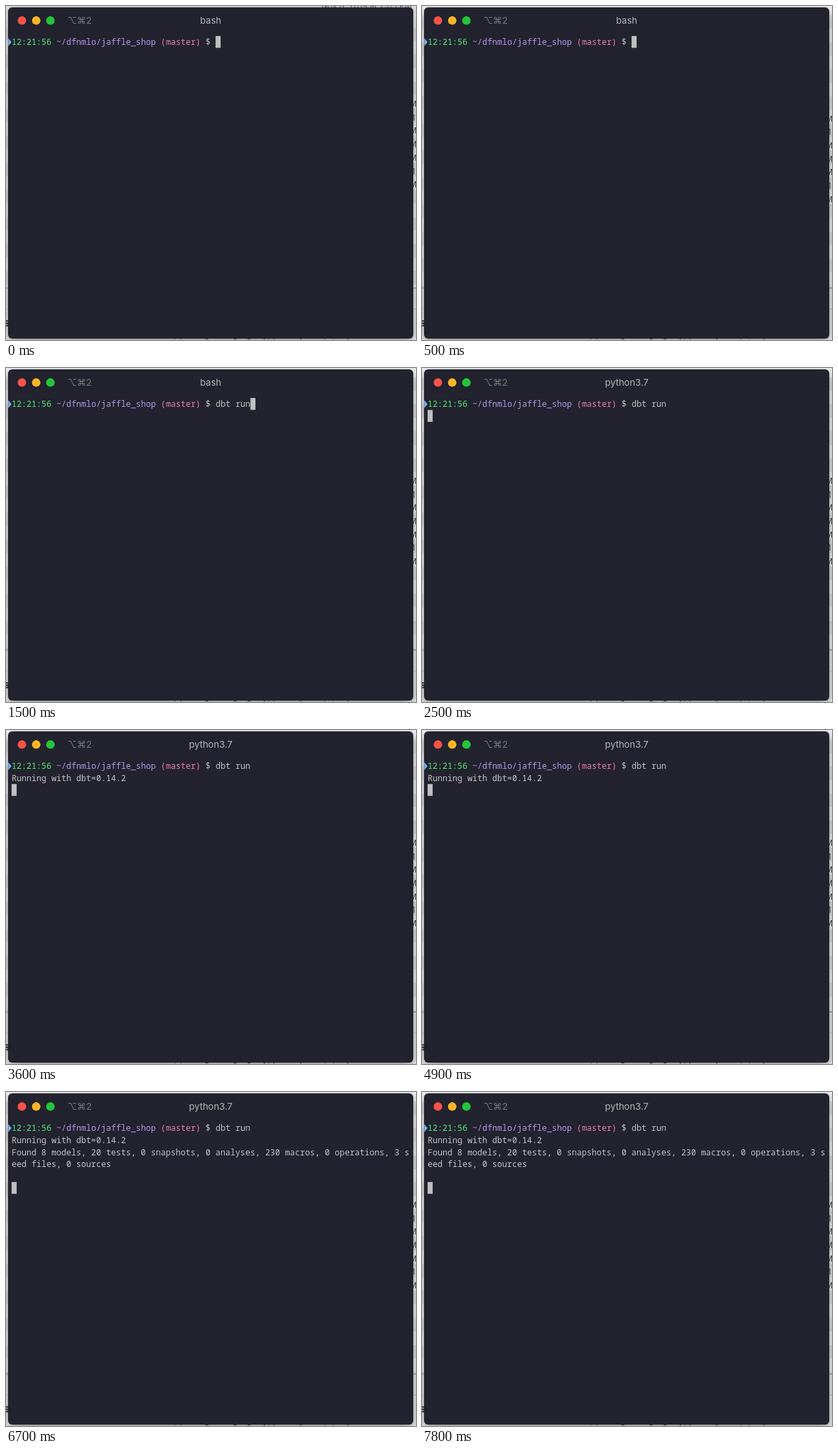
An HTML page with a canvas that plays this animation: 600x490 px, repeating every 8 s.

```html
<!DOCTYPE html>
<html lang="en">
<head>
<meta charset="utf-8">
<style>
html, body { margin: 0; height: 100%; overflow: hidden; }
canvas { display: block; }
</style>
</head>
<body>
<canvas id="stage" width="600" height="490"></canvas>
<script>
const ctx = document.getElementById('stage').getContext('2d');
const LOOP = 8000, ROW = 17.6, COL = 7.28, LEFT = 8.2, LIST_ROW = 19.85;
const MONO = '12.13px "Noto Sans Mono", monospace';
const UI = '13.5px Inter, sans-serif';
const GREY = '#c4c4c5';

const prompt = [
  ['12:21:56 ', '#50ee78'],
  ['~/dfnmlo/jaffle_shop ', '#b695ec'],
  ['(master) ', '#ee79b6'],
  ['$ ', GREY]
];
const command = 'dbt run';
const output = [
  [2900, 'Running with dbt=0.14.2'],
  [5000, 'Found 8 models, 20 tests, 0 snapshots, 0 analyses, 230 macros, 0 operations, 3 s'],
  [5000, 'eed files, 0 sources'],
  [5000, '']
];

function text(str, x, y, color, font, align = 'left') {
  ctx.font = font;
  ctx.fillStyle = color;
  ctx.textAlign = align;
  ctx.fillText(str, x, y);
}

function rect(x, y, w, h, color) {
  ctx.fillStyle = color;
  ctx.fillRect(x, y, w, h);
}

function dot(x, color) {
  ctx.fillStyle = color;
  ctx.beginPath();
  ctx.arc(x, 21.3, 6.2, 0, 7);
  ctx.fill();
}

// File list and page behind the terminal; the list glides down, then rests
function drawDesktop(t) {
  const shift = 21.8 * (1 - Math.exp(-Math.max(0, t - 50) / 90));
  rect(0, 0, 600, 490, '#f2f2f2');
  for (let i = -2; i < 22; i++)
    rect(0, i * LIST_ROW + 14 + shift - 22, 600, LIST_ROW, i % 2 ? '#f6f6f6' : '#e6e6e6');
  text('Nov 8, 2019 at 2:03 PM', 594, 4 + shift * (shift > 8 ? -1 : 1), '#555', '12px Inter, sans-serif', 'right');
  for (let i = 0; i < 7; i++)
    text('M', i % 4 === 1 ? 598.5 : 601, 148 + i * 19.7 + shift, '#555', '12px Inter, sans-serif', 'right');
  rect(0, 413, 600, 77, '#eeeeee');
  rect(0, 413, 600, 1.5, '#aaa');
  rect(0, 444, 600, 1, '#ccc');
  text('s', -3, 470, '#222', 'bold 15px Inter, sans-serif');
  text('(list, | using ) staging my, jaffle_y shop project (', 222, 486, '#444', '14px Inter, sans-serif');
}

function drawWindow(t) {
  ctx.save();
  ctx.shadowColor = 'rgba(0,0,0,.45)';
  ctx.shadowBlur = 16;
  ctx.shadowOffsetY = 4;
  ctx.fillStyle = '#22232e';
  ctx.beginPath();
  ctx.roundRect(3, 2, 593, 486, 6);
  ctx.fill();
  ctx.restore();
  dot(23.3, '#fc5249');
  dot(44.2, '#fdb528');
  dot(65, '#25c63c');
  text('⌥⌘2', 90, 26, '#77777e', '13.5px Inter, "DejaVu Sans", sans-serif');
  text(t < 2500 ? 'bash' : 'python3.7', 299.5, 26, '#b4b4b8', UI, 'center');
}

function drawTerminal(t) {
  const baseline = row => 57.3 + row * ROW;
  ctx.fillStyle = '#73b9f4';
  ctx.beginPath();
  ctx.moveTo(3.3, 47);
  ctx.lineTo(8, 53);
  ctx.lineTo(3.3, 59);
  ctx.fill();

  let col = 0, row = 0;
  for (const [str, color] of prompt) {
    text(str, LEFT + col * COL, baseline(0), color, MONO);
    col += str.length;
  }
  const typed = Math.min(command.length, Math.max(0, Math.floor((t - 800) / 100)));
  text(command.slice(0, typed), LEFT + col * COL, baseline(0), GREY, MONO);
  col += typed;

  if (t >= 1900) {
    col = 0;
    row = 1;
    for (const [start, line] of output)
      if (t >= start) text(line, LEFT, baseline(row++), GREY, MONO);
  }
  rect(LEFT + col * COL, 44 + row * ROW, 7.4, 17.4, '#c0c0c1');
}

function frame() {
  const t = performance.now() % LOOP;
  drawDesktop(t);
  drawWindow(t);
  drawTerminal(t);
  requestAnimationFrame(frame);
}
frame();
</script>
</body>
</html>
```
